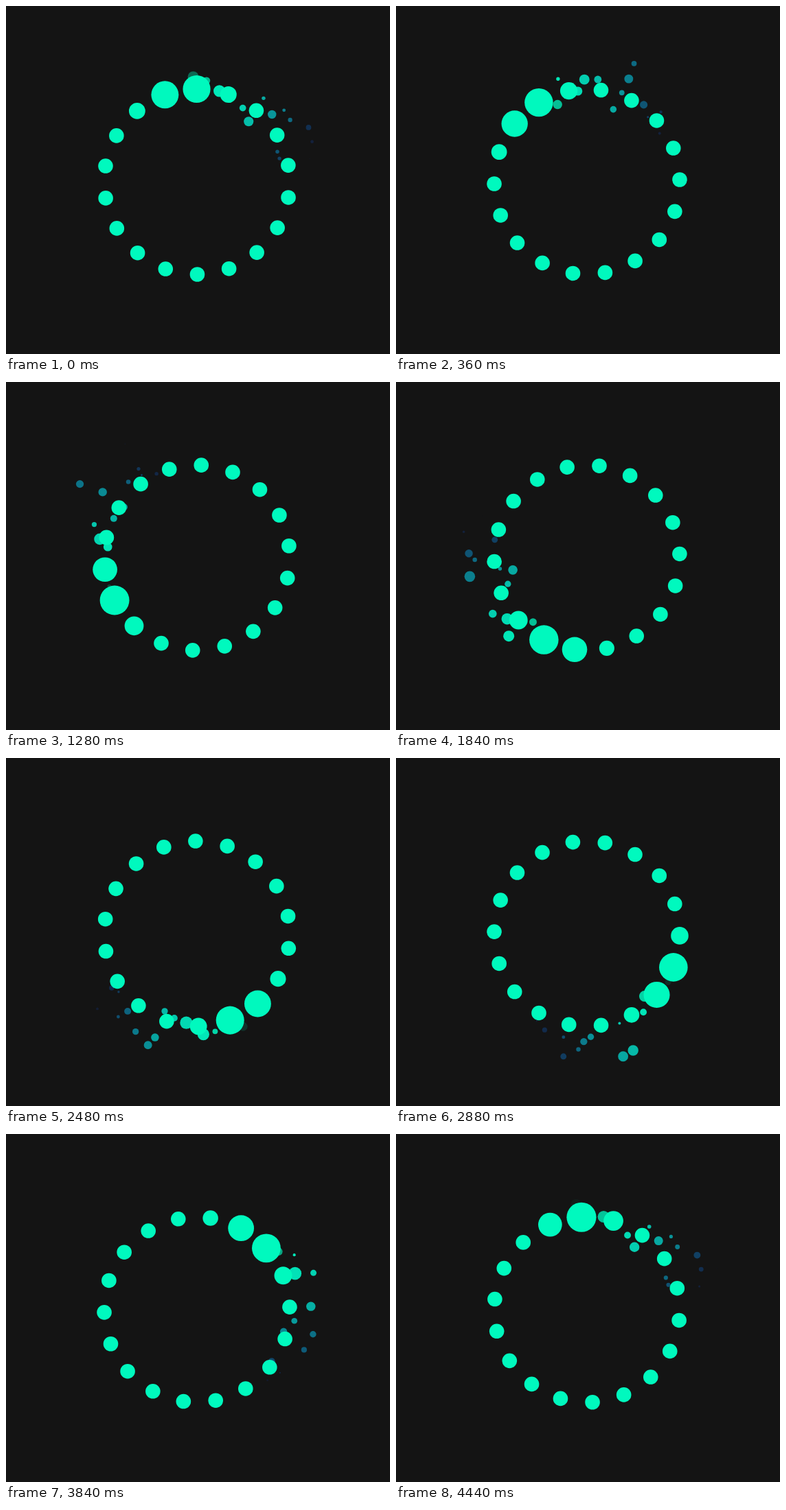
These frames come from a looping animation (559 by 507 pixels, 4480 ms). An HTML page:

```html
<!DOCTYPE html>
<html>
<head>
<meta charset="utf-8">
<style>
  html, body { margin: 0; width: 100%; height: 100%; overflow: hidden; background: #141414; }
  svg { display: block; width: 559px; height: 507px; }
</style>
</head>
<body>
<svg id="stage" viewBox="0 0 559 507"></svg>
<script>
const LOOP = 4480, STEP = 40;
const CX = 278, CY = 256, RING = 135;
const DOTS = 18, DOT_RADIUS = 10.8, SWELL = 11, SWELL_REACH = 38;
const SPARKS = 100, LIFE = 700, TRAVEL = 95;
const GREEN = [0, 249, 190], BLUE = [20, 50, 235];
const RAD = Math.PI / 180;
const stage = document.getElementById('stage');

const mod = (a, n) => ((a % n) + n) % n;
const mix = (a, b, k) => a + (b - a) * k;

let seed = 11;
const random = () => (seed = seed * 16807 % 2147483647) / 2147483647;
const jitter = range => (random() * 2 - 1) * range;

// The ring turns clockwise while the bulge runs around it the other way.
const turn = t => 360 * t / LOOP;
const bulgeAngle = t => -100 - turn(t);

function circle() {
  const el = document.createElementNS('http://www.w3.org/2000/svg', 'circle');
  stage.appendChild(el);
  return el;
}

function place(el, x, y, r) {
  el.setAttribute('cx', x.toFixed(2));
  el.setAttribute('cy', y.toFixed(2));
  el.setAttribute('r', r.toFixed(2));
}

// Each spark leaves the bulge roughly along the tangent, clockwise.
function makeSpark(_, i) {
  const born = i * LOOP / SPARKS;
  const angle = bulgeAngle(born) * RAD;
  const distance = RING + jitter(20);
  return {
    el: circle(),
    born,
    x: CX + distance * Math.cos(angle),
    y: CY + distance * Math.sin(angle),
    heading: angle + Math.PI / 2 + jitter(.5),
    size: 2 + 8 * random()
  };
}

const sparks = Array.from({ length: SPARKS }, makeSpark);
const dots = Array.from({ length: DOTS }, circle);
dots.forEach(el => el.setAttribute('fill', `rgb(${GREEN})`));

function drawSpark(s, t) {
  const p = mod(t - s.born, LOOP) / LIFE;
  s.el.style.display = p < 1 ? '' : 'none';
  if (p >= 1) return;
  const way = TRAVEL * (1 - (1 - p) ** 2);
  place(s.el, s.x + way * Math.cos(s.heading), s.y + way * Math.sin(s.heading), s.size * (1 - p ** 3));
  const rgb = GREEN.map((c, i) => Math.round(mix(c, BLUE[i], p * p)));
  s.el.setAttribute('fill', `rgb(${rgb})`);
  s.el.setAttribute('opacity', ((1 - p * p) * Math.min(1, p / .17)).toFixed(3));
}

function dotRadius(distance) {
  const k = Math.min(1, Math.abs(distance) / SWELL_REACH);
  return DOT_RADIUS + SWELL * Math.cos(k * Math.PI / 2) ** 2;
}

function drawDot(el, i, t) {
  const angle = -90.2 + i * 360 / DOTS + turn(t);
  const distance = mod(angle - bulgeAngle(t) + 180, 360) - 180;
  place(el, CX + RING * Math.cos(angle * RAD), CY + RING * Math.sin(angle * RAD), dotRadius(distance));
}

function draw(t) {
  sparks.forEach(s => drawSpark(s, t));
  dots.forEach((el, i) => drawDot(el, i, t));
}

let start;
function tick(now) {
  start ??= now;
  draw(Math.floor((now - start) % LOOP / STEP) * STEP);
  requestAnimationFrame(tick);
}
draw(0);
requestAnimationFrame(tick);
</script>
</body>
</html>
```
